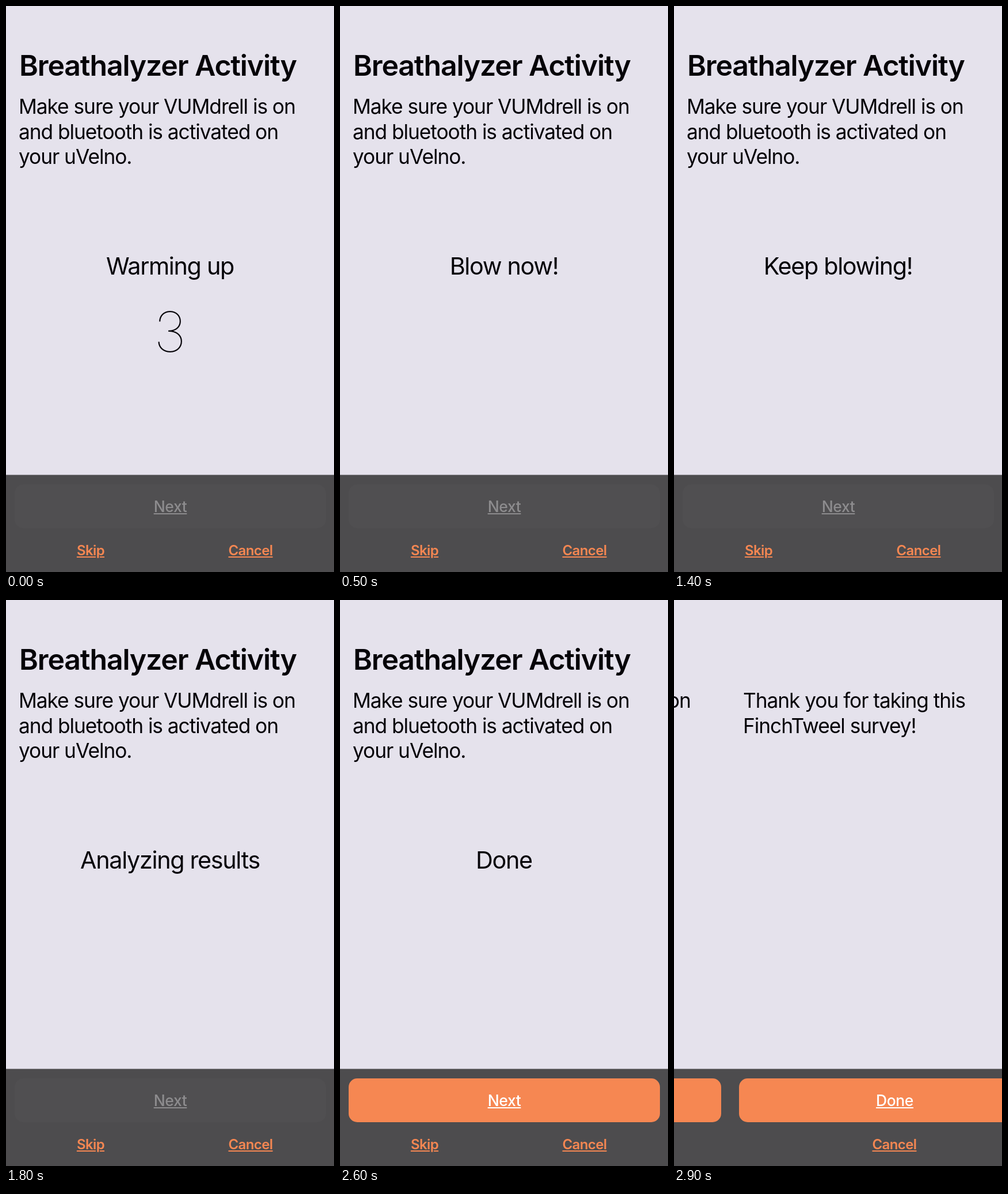
An HTML page that plays this animation: 570x982 px, repeating every 3000 ms.

```html
<!DOCTYPE html>
<html lang="en">
<head>
<meta charset="utf-8">
<title>Survey activity</title>
<style>
  html, body { margin: 0; width: 100%; height: 100%; overflow: hidden; }
  body {
    position: relative;
    background: #e5e2ec;
    color: #050308;
    font-family: Inter, "Open Sans", sans-serif;
    font-optical-sizing: none;
  }
  .bar {
    position: absolute; left: 0; right: 0; top: 813px; height: 168px;
    border-top: 1px solid #99979c;
    background: #4d4c4e;
  }
  .page { position: absolute; left: 0; top: 0; width: 570px; height: 982px; }
  .page > * { position: absolute; white-space: pre; }

  .title { left: 23px; top: 73px; font-size: 50px; line-height: 60px; font-weight: 600; letter-spacing: -.023em; }
  .body { left: 22px; top: 153px; font-size: 35.3px; line-height: 43.5px; letter-spacing: -.03em; }
  .message, .count { left: 0; width: 570px; text-align: center; }
  .message { top: 426px; font-size: 41.3px; line-height: 50px; letter-spacing: -.032em; }
  .count { top: 515px; font-size: 96px; line-height: 100px; font-weight: 140; }

  .button, .link {
    text-align: center;
    text-decoration: underline 2px;
    text-underline-offset: 1.5px;
  }
  .button {
    left: 15px; top: 829.5px; width: 541px; height: 76.5px;
    border-radius: 15px;
    background: #f68752;
    color: #fff;
    font-size: 26.5px; line-height: 77px; font-weight: 500; letter-spacing: -.015em;
  }
  .button.off { background: #504f51; color: #8d8c8e; }
  .link {
    top: 930px; width: 120px;
    color: #f68752;
    font-size: 24px; line-height: 30px; font-weight: 600; letter-spacing: -.025em;
  }
</style>
</head>
<body>
  <div class="bar"></div>

  <div class="page" id="activity">
    <div class="title" id="title">Breathalyzer Activity</div>
    <div class="body">Make sure your VUMdrell is on
and bluetooth is activated on
your uVelno.</div>
    <div class="message" id="message"></div>
    <div class="count" id="count"></div>
    <div class="button" id="next">Next</div>
    <div class="link" style="left: 87px">Skip</div>
    <div class="link" style="left: 365px">Cancel</div>
  </div>

  <div class="page" id="thanks">
    <div class="body">Thank you for taking this
FinchTweel survey!</div>
    <div class="button">Done</div>
    <div class="link" style="left: 225px">Cancel</div>
  </div>

<script>
  const LOOP = 3000;
  const PITCH = 572; // distance between neighbouring pages

  const CUES = [
    { at: 0, message: "Warming up", count: "3" },
    { at: 100, message: "Warming up", count: "2" },
    { at: 300, message: "Warming up", count: "1" },
    { at: 500, message: "Blow now!" },
    { at: 900, message: "Keep blowing!" },
    { at: 1600, message: "Analyzing results" },
    { at: 2600, message: "Done", ready: true },
    { at: 2900, message: "Done", ready: true, shift: 474 },
  ];

  const $ = id => document.getElementById(id);
  const moveTo = (id, x) => { $(id).style.transform = `translateX(${x}px)`; };

  function show({ message, count = "", ready = false, shift = 0 }) {
    $("message").textContent = message;
    $("count").textContent = count;
    $("next").classList.toggle("off", !ready);
    $("title").hidden = shift > 0;
    moveTo("activity", -shift);
    moveTo("thanks", PITCH - shift);
  }

  const start = performance.now();
  let current;

  function tick() {
    const t = (performance.now() - start) % LOOP;
    const cue = CUES.findLast(c => c.at <= t);
    if (cue !== current) show(current = cue);
    requestAnimationFrame(tick);
  }
  tick();
</script>
</body>
</html>
```
